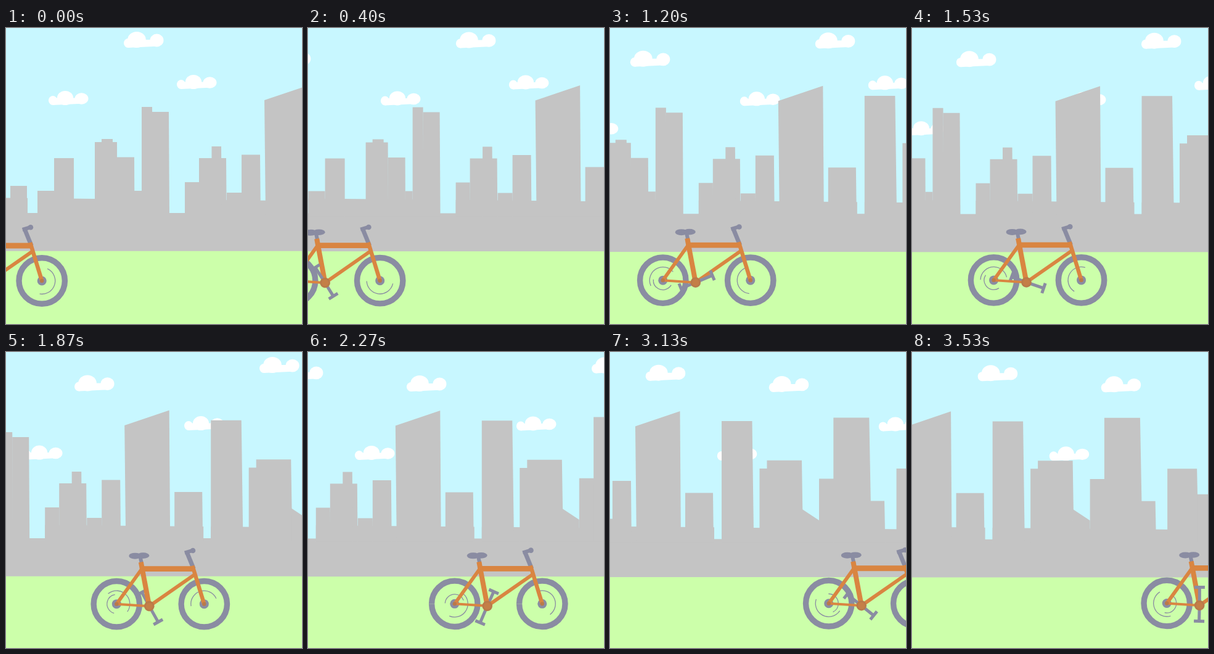
Write an HTML page with a canvas that moves like this. It is 480x480 px and loops after 3.59 s.

```html
<!DOCTYPE html>
<html lang="en">
<head>
<meta charset="utf-8">
<title>City bike</title>
<style>
html, body { margin: 0; width: 100%; height: 100%; overflow: hidden; background: #c8f7ff; }
canvas { display: block; width: 480px; height: 480px; }
</style>
</head>
<body>
<canvas id="stage" width="480" height="480"></canvas>
<script>
const ctx = document.getElementById('stage').getContext('2d');
const LOOP = 3590;
const SKY = '#c8f7ff', CITY = '#c4c4c4', GRASS = '#ccffaa';
const METAL = '#8a8ca2', ORANGE = '#d98541', RUST = '#b97a4a';
const RAD = Math.PI / 180;
const GEAR = 5.24; // degrees per step

// Bike joints, measured from the front hub
const front = [0, 0], rear = [-142, 0], bracket = [-89, 3.5];
const seat = [-101, -57], head = [-17, -57];

function polygon(color, points) {
  ctx.fillStyle = color;
  ctx.beginPath();
  points.forEach(([x, y]) => ctx.lineTo(x, y));
  ctx.fill();
}

function ellipse(color, x, y, rx, ry = rx) {
  ctx.fillStyle = color;
  ctx.beginPath();
  ctx.ellipse(x, y, rx, ry, 0, 0, 2 * Math.PI);
  ctx.fill();
}

function line(color, width, [x1, y1], [x2, y2]) {
  ctx.strokeStyle = color;
  ctx.lineWidth = width;
  ctx.beginPath();
  ctx.moveTo(x1, y1);
  ctx.lineTo(x2, y2);
  ctx.stroke();
}

function arc(width, [x, y], r, mid, span) {
  ctx.strokeStyle = METAL;
  ctx.lineWidth = width;
  ctx.beginPath();
  ctx.arc(x, y, r, (mid - span / 2) * RAD, (mid + span / 2) * RAD);
  ctx.stroke();
}

// Three bumps on a slightly tilted base
function cloud(x, y, height, peak) {
  ctx.save();
  ctx.translate(x, y);
  ellipse('#fff', 7, height - 7.5, 7, 7.5);
  ellipse('#fff', peak, height / 2, height * 0.57, height / 2);
  ellipse('#fff', 53.5, height / 2 + 1, 11, height * 0.4);
  polygon('#fff', [[7, height], [57, height - 2.5], [52, height / 2], [10, height / 2]]);
  ctx.restore();
}

const flatCloud = (x, y) => cloud(x, y, 23, 27);
const tallCloud = (x, y) => cloud(x, y, 26, 21);

function drawClouds() {
  flatCloud(69, 102);
  flatCloud(277, 76);
  flatCloud(-193, 149.5);
  tallCloud(191, 6);
  tallCloud(-109, 35.5);
  tallCloud(-309, 17.3);
}

// Walls widen towards the foot, more so further along the street
function tower(left, width, top) {
  const foot = 305, right = left + width;
  const flare = (foot - top) * left / 40000;
  polygon(CITY, [[left, top], [right, top], [right + flare, foot], [left, foot]]);
}

// Low houses, with a gap before each next block
function terrace(left, right) {
  const roof = x => 275.5 + x / 100;
  polygon(CITY, [[left, roof(left)], [right, roof(right)], [right, 305], [left, 305]]);
}

function drawCity() {
  ctx.fillStyle = CITY;
  ctx.fillRect(0, 300, 960, 70);
  terrace(0, 35);
  terrace(51, 264);
  terrace(290, 547);
  terrace(559, 960);

  tower(7, 27, 256);
  tower(51, 27, 264);
  tower(78, 32, 211);
  tower(144, 36, 185);
  tower(155, 18, 180);
  tower(180, 28, 209.5);
  tower(208, 12, 264);
  tower(220, 17, 128);
  tower(237, 27, 136);
  tower(290, 23, 250);
  tower(313, 44, 211);
  tower(333.5, 15.5, 192);
  tower(358, 24, 267);
  tower(382, 30, 205.5);
  polygon(CITY, [[419, 117], [491.5, 92.5], [493, 305], [421, 305]]);
  tower(500, 45, 225);
  tower(559, 49.5, 108.7);
  tower(620.5, 68, 185.5);
  tower(632.5, 56.5, 172.3);
  polygon(CITY, [[689, 251], [717, 269.5], [717, 305], [689, 305]]);
  tower(717, 24, 202.2);
  tower(740.3, 58, 103);
  tower(798, 25, 238);
  tower(842.5, 48, 185.5);
  tower(890.5, 60, 227);
}

function wheel(hub, turn) {
  arc(9.4, hub, 37.2, 0, 360);
  arc(1.3, hub, 21.5, turn, 165);
  ellipse(METAL, ...hub, 7.5);
}

function crank(length, angle) {
  ctx.save();
  ctx.translate(...bracket);
  ctx.rotate(angle * RAD);
  line(METAL, 5, [0, 0], [length, 0]);
  line(METAL, 5, [length, -8.5], [length, 8.5]);
  ctx.restore();
}

function drawBike(step) {
  const pedal = 6 + GEAR * step;
  const turn = 30 + GEAR * step + 20 * Math.sin((step - 5) * 8 * RAD);
  ctx.save();
  ctx.translate(58.2 + 5.847 * step, 410 - 0.03 * step);

  wheel(rear, turn + 60);
  arc(1.3, rear, 15.5, turn + 290, 155);
  wheel(front, turn);
  crank(25.5, pedal);

  line(METAL, 6, [-104, -78], [-101, -64]);
  ellipse(METAL, -112, -78, 10, 5);
  ellipse(METAL, -99, -78.5, 10, 4.8);
  line(METAL, 7, head, [-28, -84]);
  line(METAL, 6, [-31.5, -83], [-18, -87]);
  ellipse(METAL, -18.3, -86.7, 4.3);

  line(ORANGE, 4, rear, bracket);
  line(ORANGE, 5.8, rear, seat);
  line(ORANGE, 5.8, bracket, [-15, -48]);
  line(ORANGE, 8.8, seat, head);
  line(ORANGE, 8, [-102.5, -68], bracket);
  line(ORANGE, 6.5, [-19, -62], front);
  ellipse(RUST, ...front, 3.2);
  ellipse(RUST, ...rear, 3.2);

  crank(29.5, pedal + 179);
  ellipse(RUST, ...bracket, 8.3);
  ellipse('#c47f47', ...bracket, 5.5);
  ctx.restore();
}

function draw(step) {
  const drift = 0.045 * step;
  ctx.fillStyle = SKY;
  ctx.fillRect(0, 0, 480, 480);

  ctx.save();
  ctx.translate(4.89 * step, drift);
  drawClouds();
  ctx.restore();

  ctx.save();
  ctx.translate(-5.04 * step, drift);
  drawCity();
  ctx.restore();

  ctx.fillStyle = GRASS;
  ctx.fillRect(0, 361.7 + drift, 480, 120);
  drawBike(step);
}

// Motion runs at 24 steps a second, shown 15 times a second
function tick() {
  const t = performance.now() % LOOP;
  const shown = Math.floor((Math.floor(t / 10) + 0.5) * 0.15);
  draw(Math.floor(shown * 1.6 + 0.7));
  requestAnimationFrame(tick);
}
tick();
</script>
</body>
</html>
```
